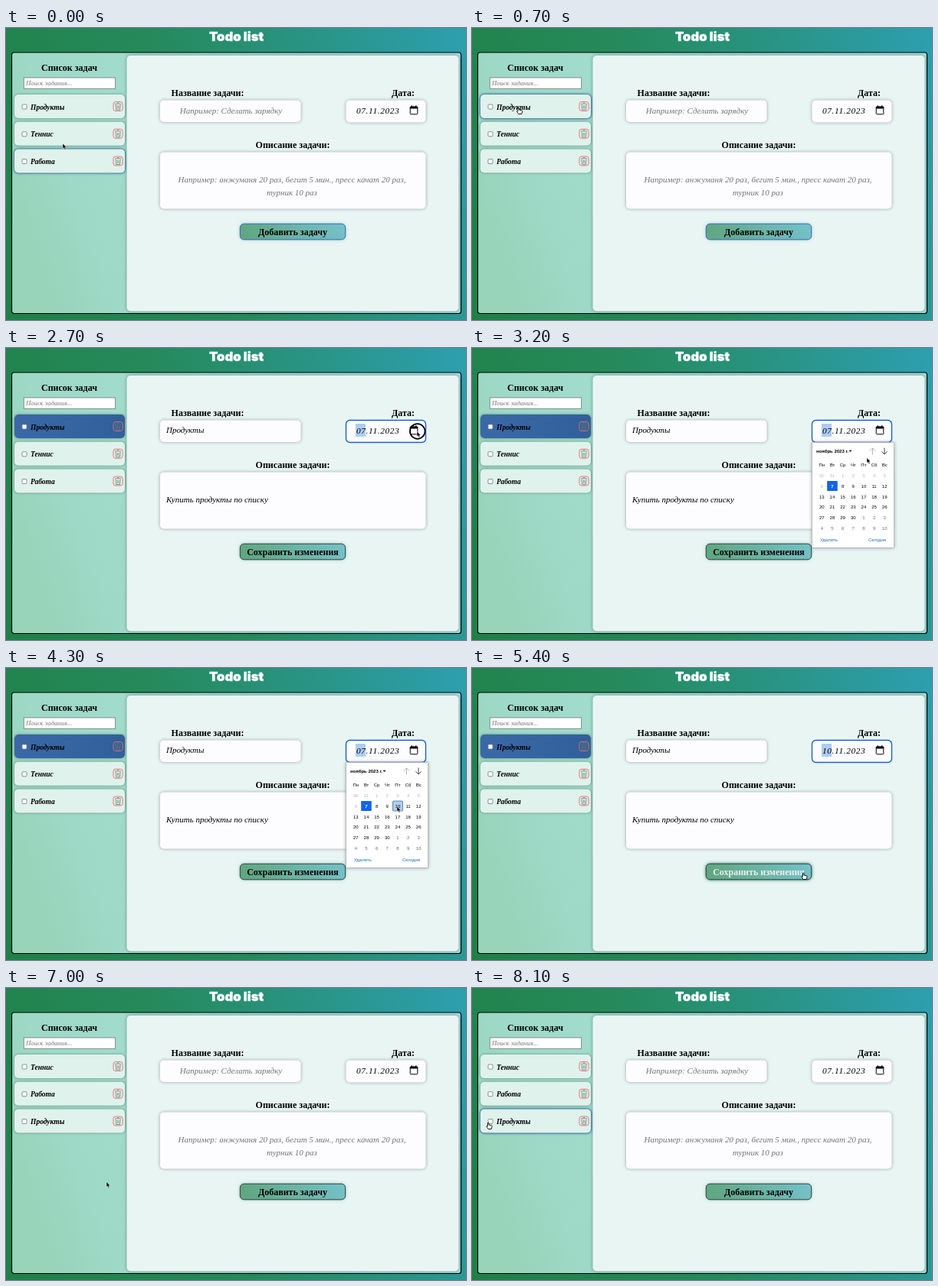
Write an HTML page that moves like this. It is 600 px wide and 382 px high and loops after 8.2 s.

```html
<!DOCTYPE html>
<html lang="ru">
<meta charset="utf-8">
<title>Todo list</title>
<style>
  html, body { margin: 0; width: 100%; height: 100%; overflow: hidden; }
  body { background: linear-gradient(70deg, #1f8045, #258a5c 45%, #2d9fb0); }
  svg { display: block; }
  text { white-space: pre; }
  .hand { font: italic 11px "Liberation Serif", serif; }
  .card { font: italic bold 9.5px "Liberation Serif", serif; }
  .search { font: italic 8.6px "Liberation Serif", serif; fill: #757575; }
  .date { font: italic 11.4px "Liberation Serif", serif; letter-spacing: .6px; }
  .head { font: bold 12px "Liberation Serif", serif; }
  .title { font: 900 16.6px Inter, sans-serif; fill: #fff; stroke: #fff; stroke-width: .4; }
  .cal { font: 6px "Liberation Sans", sans-serif; }
  .bold { font-weight: bold; }
  .mid { text-anchor: middle; }
  .ph { fill: #757575; }
  .soft { filter: drop-shadow(0 0 2px #0005); }
</style>
<svg id="stage" width="600" height="382" viewBox="0 0 600 382">
  <defs>
    <linearGradient id="side" gradientUnits="userSpaceOnUse" x1="8" y1="210" x2="594" y2="0">
      <stop stop-color="#97d4ba"/><stop offset=".12" stop-color="#9dd9c6"/>
      <stop offset=".25" stop-color="#a0dbca"/><stop offset="1" stop-color="#a6dbe0"/>
    </linearGradient>
    <linearGradient id="btn" y1=".1" y2="0">
      <stop stop-color="#60a782"/><stop offset="1" stop-color="#76c2cb"/>
    </linearGradient>
    <linearGradient id="blue">
      <stop stop-color="#3a69a7"/><stop offset="1" stop-color="#305f9b"/>
    </linearGradient>
  </defs>
  <rect x="7.5" y="32" width="586" height="341.5" rx="3" fill="url(#side)" stroke="#000" stroke-width="1.2"/>
  <rect class="soft" x="157.5" y="36" width="433" height="334.5" rx="5" fill="#e8f5f3"/>
  <text class="title mid" x="300.5" y="17">Todo list</text>
  <text class="head mid" x="82.5" y="56">Список задач</text>
  <rect x="23.3" y="65" width="119.4" height="14.3" fill="#fff" stroke="#777" stroke-width=".8"/>
  <text class="search" x="26" y="75">Поиск задания...</text>
  <text class="head mid" x="263" y="89">Название задачи:</text>
  <text class="head mid" x="518" y="89">Дата:</text>
  <text class="head mid" x="374" y="157">Описание задачи:</text>
  <g id="view"></g>
</svg>
<script>
const LOOP = 8200, STEP = 100;
const SELECT = 800, FOCUS = 2700, OPEN = 2900, PICK = 4500, SAVE = 5800;
const view = document.getElementById('view');

// time, x, y of the pointer tip
const path = [
  [0, 74, 151], [300, 68, 128], [600, 60, 104], [900, 62, 104], [1300, 323, 119],
  [1800, 430, 118], [2500, 536, 109], [2900, 536, 109], [3500, 494, 178], [3600, 494, 178],
  [3800, 510, 181], [4500, 510, 181], [4900, 480, 230], [5300, 432, 268], [5900, 432, 268],
  [6500, 320, 266], [7000, 131, 253.5], [7600, 62, 212], [8000, 21, 176], [8200, 21, 176]
];

const clamp = v => Math.max(0, Math.min(1, v));
const ease = v => v * v * (3 - 2 * v);
const within = (t, a, b) => t >= a && t < b;
const fade = (t, a, b, d = 250) => clamp((t - a) / d) * (1 - clamp((t - b) / d));

function pointer(t) {
  const i = path.findIndex(p => p[0] > t), [t0, x0, y0] = path[i - 1], [t1, x1, y1] = path[i];
  const k = ease((t - t0) / (t1 - t0));
  return [x0 + (x1 - x0) * k, y0 + (y1 - y0) * k];
}

const rect = (x, y, w, h, rx, fill, more = '') =>
  `<rect x="${x}" y="${y}" width="${w}" height="${h}" rx="${rx}" fill="${fill}" ${more}/>`;
const text = (cls, x, y, s, fill = '') =>
  `<text class="${cls}" x="${x}" y="${y}" ${fill && `fill="${fill}"`}>${s}</text>`;
const line = (d, color = '#000', w = 1) =>
  `<path d="${d}" fill="none" stroke="${color}" stroke-width="${w}"/>`;

function card(name, i, hover, picked) {
  const glow = `filter:drop-shadow(0 0 1.5px #0006) drop-shadow(0 0 1.5px rgba(25,85,200,${hover}))`;
  return `<g transform="translate(0 ${87 + i * 35.75})">`
    + rect(11, 0, 144, 31, 5, '#dff2ec', `style="${glow}"`)
    + rect(11, 0, 144, 31, 5, 'url(#blue)', `opacity="${picked}"`)
    + rect(21, 13, 6, 6, 1, '#fff', 'stroke="#767676" stroke-width=".8"')
    + text('card', 32, 19.5, name)
    + rect(140, 9.5, 12.2, 12, 3, 'none', 'stroke="#ea6a64" stroke-width=".9"')
    + line('M142 12.2H150.2M144.8 11H147.4M143 13L143.6 20H148.6L149.2 13M145.2 14.2V18.6M147 14.2V18.6', '#6b7777', .75)
    + '</g>';
}

function cards(t) {
  const names = t < SAVE ? ['Продукты', 'Теннис', 'Работа'] : ['Теннис', 'Работа', 'Продукты'];
  const hover = [
    fade(t, 450, 1000), fade(t, 150, 350),
    Math.max(1 - clamp((t + 50) / 250), fade(t, 7750, 9000))
  ];
  return names.map((n, i) => card(n, i, hover[i], i ? 0 : t < SAVE ? fade(t, SELECT, SAVE, 200) : 0)).join('');
}

function form(t) {
  const editing = within(t, SELECT, SAVE), focus = within(t, FOCUS, SAVE);
  const soft = 'class="soft"', hover = fade(t, 5100, 6000), shade = Math.round(238 * hover);
  let s = rect(201, 94.5, 183.5, 28.5, 5, '#fdfcff', soft)
    + rect(443.5, 94.5, 104, 29, 5, '#fdfcff', focus ? 'stroke="#1762d0" stroke-width="1.4"' : soft)
    + rect(201, 162.5, 346.5, 74, 5, '#fdfcff', soft);
  if (focus) s += rect(456, 99, 13, 17, 0, '#acccf4');
  s += text('date', 457, 112, (within(t, PICK, SAVE) ? '10' : '07') + '.11.2023')
    + rect(527.2, 103, 9.6, 9.8, 1, 'none', 'stroke="#000" stroke-width="1"')
    + rect(526.8, 102.8, 10.4, 2.6, 1, '#000')
    + line('M529.2 101.3V104M534.8 101.3V104', '#000', 1.1);
  if (within(t, FOCUS, OPEN))
    s += '<circle cx="536.7" cy="109" r="9.8" fill="none" stroke="#000" stroke-width="1.7"/>';
  s += editing
    ? text('hand', 209, 111, 'Продукты') + text('hand', 209, 202, 'Купить продукты по списку')
    : text('hand mid ph', 293.5, 111.5, 'Например: Сделать зарядку')
      + text('hand mid ph', 373, 202, 'Например: анжуманя 20 раз, бегит 5 мин., пресс качат 20 раз,')
      + text('hand mid ph', 373, 218.5, 'турник 10 раз');
  return s
    + rect(305.3, 256.2, 137.4, 20.6, 5, 'url(#btn)',
      `stroke="${t < SELECT ? '#2b66c4' : '#23403a'}" stroke-width="1" style="filter:drop-shadow(0 0 2px rgba(0,90,60,${.25 + .5 * hover}))"`)
    + text('head mid', 374, 270.5, editing ? 'Сохранить изменения' : 'Добавить задачу', `rgb(${shade},${shade},${shade})`);
}

function calendar(t) {
  const hovered = t >= 3800 ? 10 : 9;
  let s = rect(443.5, 123.5, 107, 138, 1, '#fff', 'stroke="#aaa" stroke-width=".7" class="soft"')
    + text('cal bold', 449, 137, 'ноябрь 2023 г.')
    + '<path d="M491.5 133.7h4l-2 2.3z"/>'
    + line('M522.5 139.5V131M518.8 134.7L522.5 131L526.2 134.7', '#aaa', .9)
    + line('M538 130.5V139M534.3 135.3L538 139L541.7 135.3', '#333', .9);
  const col = i => 456.3 + (i % 7) * 13.65;
  ['Пн', 'Вт', 'Ср', 'Чт', 'Пт', 'Сб', 'Вс'].forEach((d, i) => s += text('cal mid', col(i), 155, d));
  for (let i = 0; i < 42; i++) {
    const n = i - 1, x = col(i), y = 169.3 + Math.floor(i / 7) * 13.7;
    const day = n < 1 ? n + 31 : n > 30 ? n - 30 : n;
    if (n === 7) s += rect(x - 6.8, y - 9, 13.6, 13, 0, '#1265e8');
    if (n === hovered && t >= 3500)
      s += rect(x - 6.4, y - 9, 13, 13, 1, '#b3cdec', 'stroke="#3f6ea8" stroke-width=".8"');
    s += text('cal mid' + (n === 7 ? ' bold' : ''), x, y, day,
      n === 7 ? '#fff' : n < 7 ? '#b5b5b5' : n > 30 ? '#666' : '#000');
  }
  return s + text('cal', 454, 253, 'Удалить', '#1265c8') + text('cal', 517, 253, 'Сегодня', '#1265c8');
}

function cursor(t) {
  const [x, y] = pointer(t);
  const beam = within(t, 1200, 2400);
  const hand = within(t, 500, 1000) || within(t, 5100, 6000) || t >= 7750;
  const shape = beam
    ? line('M-1.5 -3.5Q0 -3.5 0 -2.5Q0 -3.5 1.5 -3.5M0 -3V4M-1.5 4.3Q0 4.3 0 3.5Q0 4.3 1.5 4.3', '#222', .9)
    : hand
      ? '<path d="M-.5 .5Q.3 -.5 1 .5V3L4.5 3.8Q5.3 4.2 5 5.8L4.2 8.5H.2L-2 5.3Q-2.3 4 -.5 4.8Z" fill="#fff" stroke="#000" stroke-width=".9"/>'
      : '<path d="M0 0V7L1.6 5.6L2.8 8.2L4 7.6L2.9 5.2H5Z" stroke="#fff" stroke-width=".5"/>';
  return `<g transform="translate(${x} ${y})">${shape}</g>`;
}

let last = -1;
function tick(now) {
  const t = Math.floor(now % LOOP / STEP) * STEP;
  if (t !== last) {
    last = t;
    view.innerHTML = cards(t) + form(t) + (within(t, OPEN, PICK) ? calendar(t) : '') + cursor(t);
  }
  requestAnimationFrame(tick);
}
tick(performance.now());
</script>
</html>
```
